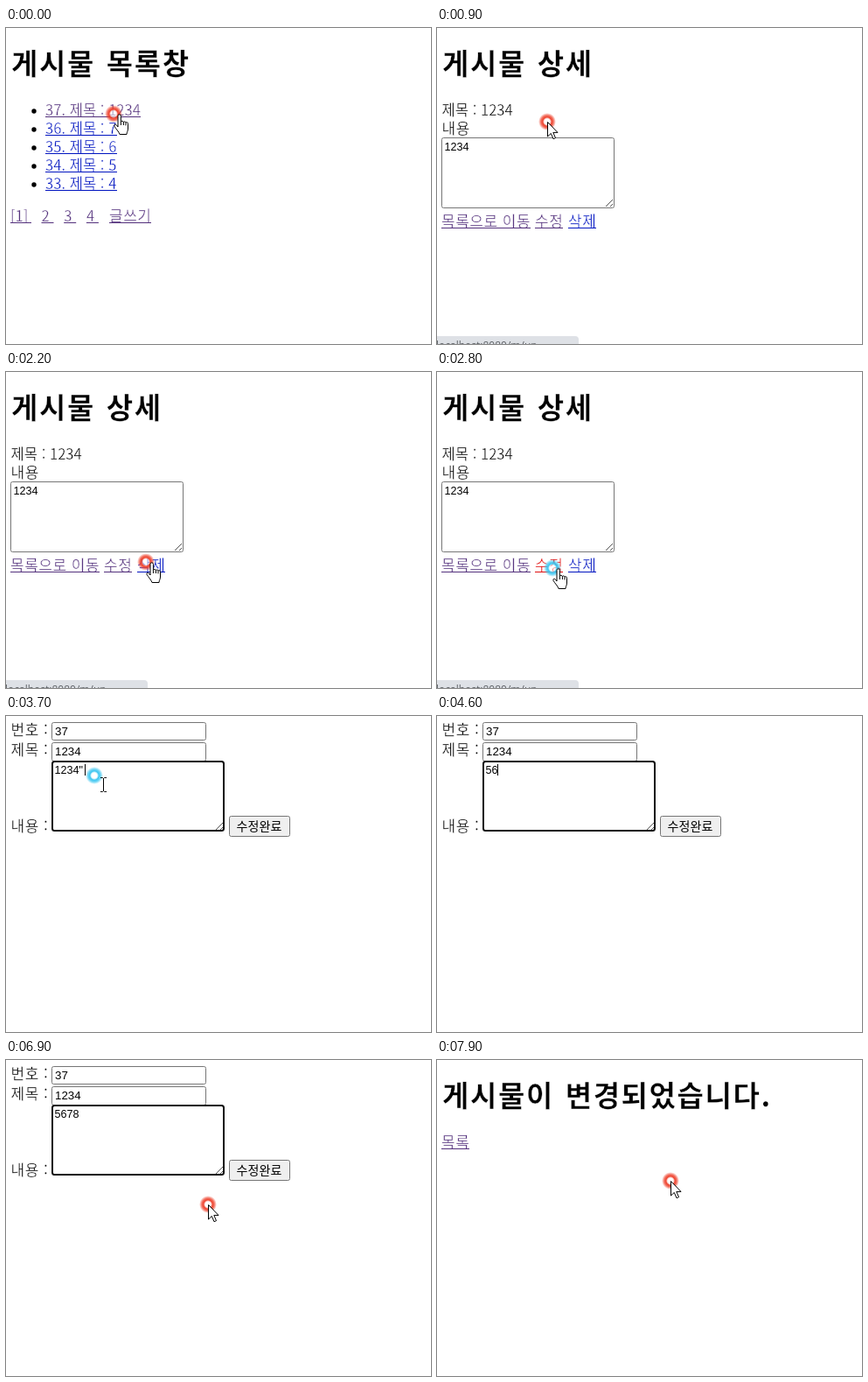
An HTML page that plays this animation: 486 by 361 pixels, repeating every 8 s.

```html
<!DOCTYPE html>
<html lang="ko">
<head>
<meta charset="utf-8">
<title>게시판</title>
<style>
  html, body { margin: 0; width: 100%; height: 100%; overflow: hidden; background: #fff; }
  svg { display: block; }
  text { white-space: pre; }
  /* A thin white outline slims the letters. */
  .body, .title { stroke: #fff; stroke-width: .4px; }
  .body { font: 300 16.6px "Noto Sans CJK KR", "Noto Sans CJK", "Noto Sans CJK JP", sans-serif; }
  .hangul { font-size: 17px; letter-spacing: .5px; }
  .title { font: 700 33px "Noto Sans CJK KR", "Noto Sans CJK", "Noto Sans CJK JP", sans-serif; letter-spacing: 1.6px; word-spacing: 2px; }
  .button { font: 400 14px "Noto Sans CJK KR", "Noto Sans CJK", "Noto Sans CJK JP", sans-serif; letter-spacing: .1px; }
  .input { font: 13.33px "Liberation Sans", Arial, sans-serif; }
  .area { font: 12.6px "Liberation Sans", Arial, sans-serif; }
  .status { font: 12px "Open Sans", "Noto Sans", sans-serif; fill: #5f6368; }
</style>
</head>
<body>
<svg id="stage" width="486" height="361" viewBox="0 0 486 361"></svg>
<script>
const LOOP = 8000, STEP = 100;
const VISITED = '#53307c', LINK = '#0014c0', ACTIVE = '#e01010';
const GRAY = '#767676';

const text = (x, y, str, cls = 'body', extra = '') =>
  `<text x="${x}" y="${y}" class="${cls}" ${extra}>${str}</text>`;
const label = (x, y, str) => text(x, y, str, 'body hangul');
const title = str => text(6, 53, str, 'title');
const link = (x, right, y, str, color, cls = 'body', id = '') =>
  `<g fill="${color}" ${id && `id="${id}"`}>${text(x, y, str, cls)}` +
  `<rect x="${x}" y="${y + 1}" width="${right - x}" height="1"/></g>`;
const hangulLink = (x, right, y, str, color, id) => link(x, right, y, str, color, 'body hangul', id);
const box = (x, y, w, h, fill = '#fff', stroke = GRAY, line = 1, r = 2) =>
  `<rect x="${x + line / 2}" y="${y + line / 2}" width="${w - line}" height="${h - line}" rx="${r}"
    fill="${fill}" stroke="${stroke}" stroke-width="${line}"/>`;
const grip = (x, y) =>
  `<path d="M${x - 8} ${y}l8-8M${x - 3} ${y}l3-3" stroke="#555" stroke-width="1" fill="none"/>`;
const page = (id, content) => `<g id="${id}" display="none">${content}</g>`;

function listPage() {
  const rows = ['37. 제목 : 1234', '36. 제목 : 7', '35. 제목 : 6', '34. 제목 : 5', '33. 제목 : 4'];
  return title('게시물 목록창') +
    rows.map((row, i) => {
      const y = 100 + 21 * i;
      return `<circle cx="32" cy="${y - 5}" r="2.7"/>` +
        link(45, i ? 127 : 154, y, row, i ? LINK : VISITED, 'body', i ? '' : 'openLink');
    }).join('') +
    link(5, 29, 221, '[1]', VISITED) +
    [2, 3, 4].map((n, i) => link(40.5 + 25.7 * i, 54.5 + 25.7 * i, 221, n, VISITED)).join('') +
    hangulLink(118, 166, 221, '글쓰기', VISITED);
}

function detailPage() {
  return title('게시물 상세') + text(5.5, 100, '제목 : 1234') + label(5.5, 121, '내용') +
    box(5, 125, 198, 81) + grip(201, 204) + text(8.5, 140, '1234', 'area') +
    hangulLink(5, 107, 227, '목록으로 이동', VISITED) +
    hangulLink(112, 144, 227, '수정', VISITED, 'editLink') +
    hangulLink(150, 182, 227, '삭제', LINK);
}

function editPage() {
  return label(5.5, 22, '번호 :') + label(5.5, 45, '제목 :') + label(5.5, 132, '내용 :') +
    box(52, 7, 177, 21) + text(56, 22, '37', 'input') +
    box(52, 30, 177, 22) + text(56, 45, '1234', 'input') +
    `<g id="plainArea">${box(52, 51, 198, 81)}</g>` +
    `<g id="focusArea">${box(52, 51, 198, 81, '#fff', '#101010', 2, 2.5)}</g>` + grip(248, 130) +
    '<rect id="selection" x="55" y="54" width="35" height="15" fill="#0078d7"/>' +
    text(55.5, 66, '', 'area', 'id="content"') +
    '<rect id="caret" y="55" width="1" height="13"/>' +
    box(255, 114, 70, 24, '#efefef') + text(263.5, 131, '수정완료', 'button');
}

const donePage = () => title('게시물이 변경되었습니다.') + hangulLink(5, 37, 100, '목록', VISITED);

const glow = (id, color) => `<radialGradient id="${id}">
  <stop offset=".3" stop-color="#fff" stop-opacity=".5"/>
  <stop offset=".5" stop-color="${color}" stop-opacity=".95"/>
  <stop offset=".7" stop-color="${color}" stop-opacity=".75"/>
  <stop offset="1" stop-color="${color}" stop-opacity="0"/></radialGradient>`;

const shapes = {
  arrow: '<path d="M.5.5V17l3.8-3.6 2.7 6.3 2.5-1.1-2.7-6.2H12z" fill="#fff" stroke="#000"/>',
  hand: `<path d="M5 15V2.5a1.7 1.7 0 0 1 3.4 0V9.5c0-1.5 3-1.5 3 .3c0-1.3 2.6-1.2 2.6.5
    c.2-1 2.5-.9 2.5 1V17c0 3-1.5 4-1.5 6.5H7C6.5 21 2.5 17 1.1 14.4c-.9-1.9 1-2.9 2.3-1.5z
    M8.4 9.5v3.5m3-3v3m2.6-2.6v3" fill="#fff" stroke="#000"/>`,
  beam: '<path d="M7 2.5h2.5l1 1 1-1H14M10.5 3v15M7 18.5h2.5l1-1 1 1H14" fill="none" stroke="#000"/>'
};

const stage = document.getElementById('stage');
stage.innerHTML = `<defs>${glow('idle', '#ee3a24')}${glow('pressed', '#35c4f0')}</defs>
  <rect width="486" height="361" fill="#fff"/>` +
  page('list', listPage()) + page('detail', detailPage()) +
  page('edit', editPage()) + page('done', donePage()) +
  `<g id="status"><path d="M0 352H158q4 0 4 4V361H0z" fill="#dee1e6"/>
    ${text(-1, 367, 'localhost:8080/m/up', 'status')}</g>
  <g id="cursor"><circle id="ring" r="10"/>
    ${Object.keys(shapes).map(k => `<g id="${k}">${shapes[k]}</g>`).join('')}</g>`;

const el = id => document.getElementById(id);
const show = (id, on) => el(id).setAttribute('display', on ? 'inline' : 'none');
const between = (t, a, b) => t >= a && t < b;
const latest = (t, track) => track.filter(([at]) => at <= t).pop()[1];

const pages = [[0, 'list'], [700, 'detail'], [3100, 'edit'], [7500, 'done']];
const pointer = [[0, 'hand'], [700, 'arrow'], [1100, 'beam'], [1400, 'hand'], [3100, 'arrow'],
  [3400, 'beam'], [6600, 'arrow']];
const typing = [[0, '1234"'], [4400, ''], [4500, '5'], [4600, '56'], [4800, '5645'],
  [5700, '564'], [5900, '56'], [6200, '567'], [6300, '5678']];
const presses = [[500, 700], [2700, 3000], [3600, 4100], [7300, 7400]];
const carets = [[3600, 3800], [4400, 5400], [5900, 6600]];
const moves = [[0, 123, 98], [800, 123, 98], [1400, 160, 217], [2200, 160, 217], [2600, 132, 224],
  [3100, 132, 224], [3500, 101, 68], [3700, 101, 68], [3900, 18, 48], [4100, -24, 48],
  [6600, 8, 306], [6900, 231, 165], [7200, 288, 124], [7500, 288, 124], [7800, 267, 138], [8000, 267, 138]];

function position(t) {
  const i = moves.findIndex(([at]) => at > t);
  const [t0, x0, y0] = moves[i - 1], [t1, x1, y1] = moves[i];
  const p = (t - t0) / (t1 - t0), k = p * p * (3 - 2 * p);
  return [x0 + (x1 - x0) * k, y0 + (y1 - y0) * k].map(Math.round);
}

function update(t) {
  const within = spans => spans.some(([a, b]) => between(t, a, b));
  const pressed = within(presses);
  const content = latest(t, typing);
  const selected = between(t, 3800, 4400);

  for (const [, name] of pages) show(name, name === latest(t, pages));
  for (const name in shapes) show(name, name === latest(t, pointer));

  el('openLink').setAttribute('fill', pressed ? ACTIVE : VISITED);
  el('editLink').setAttribute('fill', pressed ? ACTIVE : VISITED);
  show('status', between(t, 500, 1000) || between(t, 1900, 3200));

  show('plainArea', t < 3600);
  show('focusArea', t >= 3600);
  show('selection', selected);
  el('content').textContent = content;
  el('content').setAttribute('fill', selected ? '#fff' : '#000');
  show('caret', within(carets));
  el('caret').setAttribute('x', 55 + 7 * content.length);

  show('cursor', !between(t, 4100, 6600));
  el('cursor').setAttribute('transform', `translate(${position(t)})`);
  el('ring').setAttribute('fill', `url(#${pressed ? 'pressed' : 'idle'})`);
}

const start = performance.now();
function frame() {
  const t = (performance.now() - start) % LOOP;
  update(Math.floor(t / STEP) * STEP);
  requestAnimationFrame(frame);
}
frame();
</script>
</body>
</html>
```
